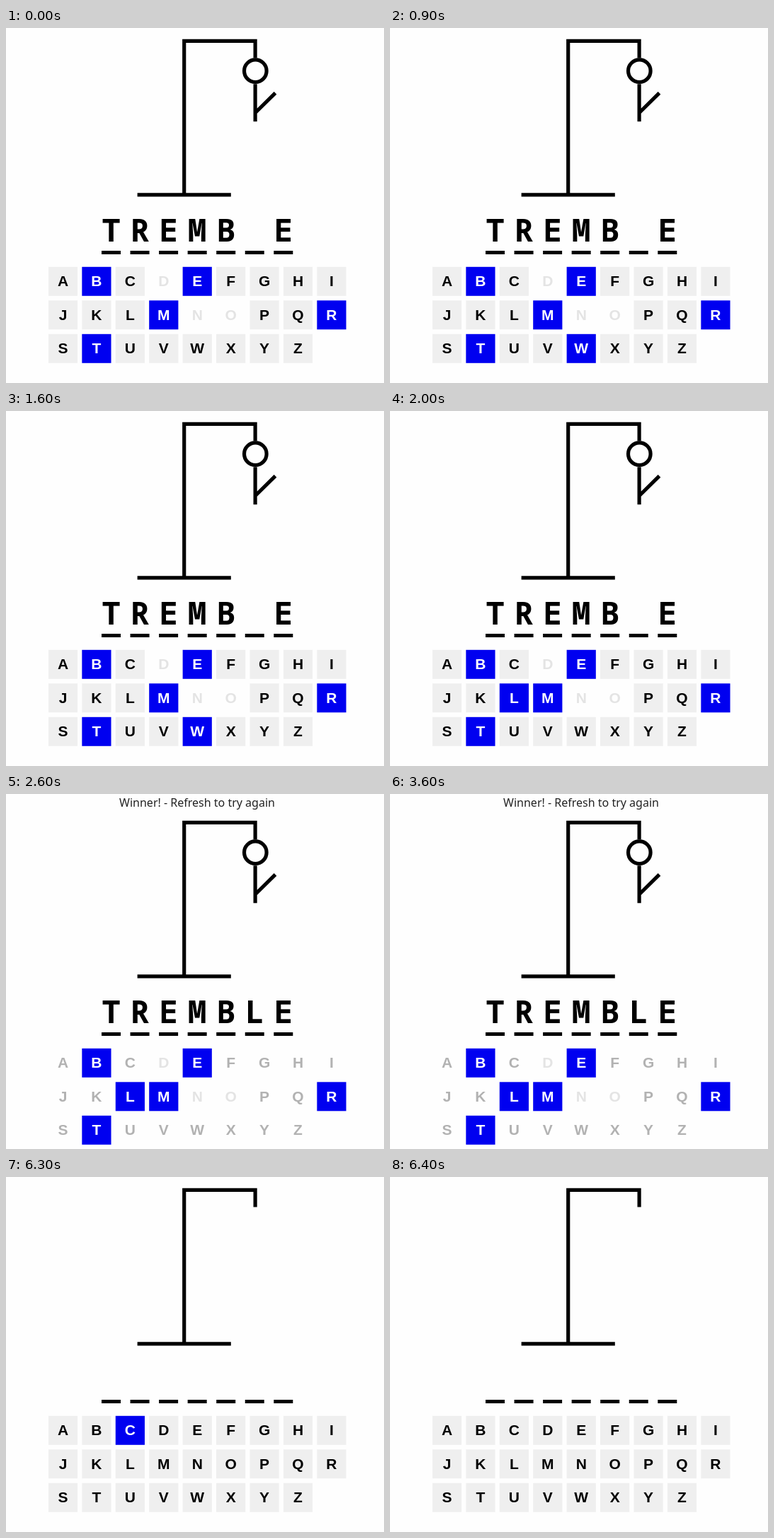
An HTML page that plays this animation: 534 by 502 pixels, repeating every 7300 ms.

```html
<!DOCTYPE html>
<html lang="en">
<head>
<meta charset="utf-8">
<title>Hangman</title>
<style>
  html, body { margin: 0; width: 100%; height: 100%; overflow: hidden; background: #fefefe; }
  svg { display: block; }
  text { text-anchor: middle; }
  .lines { fill: none; stroke: #000; stroke-width: 5.2; }
  .word { font: 600 44.5px "Noto Sans Mono", monospace; }
  .message { font: 16px "Noto Sans", sans-serif; fill: #222; }
  .key { font: bold 21px "Liberation Sans", Arial, sans-serif; }
  .key rect { fill: #efefef; }
  .over rect { fill: none; }
  .over text { fill: #b2b2b2; }
  .key.wrong rect { fill: none; }
  .key.wrong text { fill: #e4e4e4; }
  .key.active rect { fill: #0000f0; }
  .key.active text { fill: #fff; }
</style>
</head>
<body>
<svg width="534" height="502" viewBox="0 0 534 502">
  <text id="message" class="message" x="270" y="17.5">Winner! - Refresh to try again</text>
  <g id="game">
    <path class="lines" d="M185.6 235.8H317.8M251.7 235.8V18.3H352.1V42.5"/>
    <g id="body" class="lines">
      <circle cx="352.3" cy="60.7" r="15.8"/>
      <path d="M352.1 79.3V132.2M351.5 120.5L380.5 91.8"/>
    </g>
    <g id="word" class="word"></g>
    <g id="keys"></g>
  </g>
</svg>
<script>
const LOOP = 7300, WON = 2600, RESET = 4600;
const WORD = 'TREMBLE', MISSES = 'DNO';
// Pointer position as [start time, hovered key]
const HOVERS = [
  [0, ''], [700, 'V'], [900, 'W'], [1000, 'X'], [1200, 'P'], [1300, 'G'],
  [1400, 'P'], [1500, 'X'], [1600, 'W'], [1700, 'V'], [1800, 'U'], [2000, 'L'],
  [6300, 'C'], [6400, '']
];

const byId = id => document.getElementById(id);
const [message, game, body, word, keyboard] =
  ['message', 'game', 'body', 'word', 'keys'].map(byId);

function add(parent, tag, attrs, text = '') {
  const node = document.createElementNS('http://www.w3.org/2000/svg', tag);
  for (const name in attrs) node.setAttribute(name, attrs[name]);
  node.textContent = text;
  return parent.appendChild(node);
}

const slots = [...WORD].map((letter, i) => {
  const x = 148.5 + 40.55 * i;
  add(word, 'rect', { x: x - 13.5, y: 315, width: 27, height: 5 });
  return { letter, node: add(word, 'text', { x, y: 302 }, letter) };
});

const keys = [...'ABCDEFGHIJKLMNOPQRSTUVWXYZ'].map((letter, i) => {
  const x = 80.5 + 47.43 * (i % 9), y = 358 + 47.5 * Math.floor(i / 9);
  const node = add(keyboard, 'g', {});
  add(node, 'rect', { x: x - 20.6, y: y - 20.2, width: 41.2, height: 41 });
  add(node, 'text', { x, y: y + 7 }, letter);
  return { letter, node };
});

const show = (node, visible) => node.setAttribute('visibility', visible ? 'visible' : 'hidden');

function draw(now) {
  const t = now % LOOP;
  const playing = t < RESET, won = playing && t >= WON;
  const hovered = HOVERS.findLast(([start]) => t >= start)[1];
  const found = letter => playing && WORD.includes(letter) && (won || letter !== 'L');

  show(message, won);
  show(body, playing);
  game.setAttribute('transform', `translate(0 ${won ? 22 : 0})`);
  keyboard.setAttribute('class', won ? 'over' : '');
  for (const { letter, node } of slots) show(node, found(letter));
  for (const { letter, node } of keys) {
    const active = found(letter) || letter === hovered;
    const wrong = playing && MISSES.includes(letter);
    node.setAttribute('class', `key ${active ? 'active' : wrong ? 'wrong' : ''}`);
  }
  requestAnimationFrame(draw);
}
requestAnimationFrame(draw);
</script>
</body>
</html>
```
